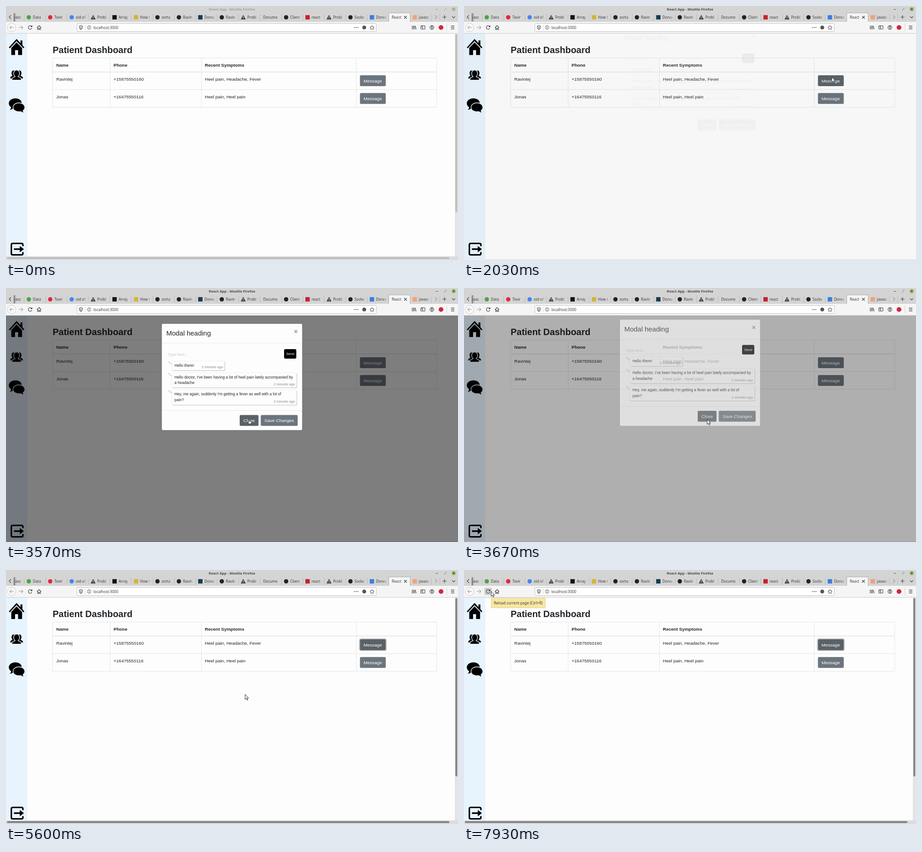
These frames come from a looping animation (998 by 561 pixels, 8000 ms). An HTML page:

```html
<!DOCTYPE html>
<html lang="en">
<head>
<meta charset="utf-8">
<title>Patient Dashboard</title>
<style>
html, body { margin: 0; width: 100%; height: 100%; overflow: hidden; }
svg { display: block; width: 998px; height: 561px; }
text { font: 9.98px "Liberation Sans", Arial, sans-serif; fill: #212529; white-space: pre; }
.ui { font: 8.1px "Noto Sans", sans-serif; fill: #3c3c3c; }
.title { font-weight: 700; font-size: 7.8px; }
.b { font-weight: 700; }
.h1 { font-weight: 700; font-size: 19.96px; }
.h4 { font-size: 14.97px; }
.msg { font-size: 8.48px; }
.ago { font-size: 7.5px; fill: #888; }
.send { font-size: 7.5px; fill: #fff; }
.hint { font-size: 8.48px; fill: #c9c9c9; }
.btn { fill: #fff; }
.line { fill: none; stroke: #444; stroke-width: 1.2; }
</style>
</head>
<body>
<svg id="stage" viewBox="0 0 998 561"></svg>
<script>
const rect = (x, y, w, h, fill, more = '') =>
  `<rect x="${x}" y="${y}" width="${w}" height="${h}" fill="${fill}" ${more}/>`;
const text = (x, y, s, cls = '', more = '') => `<text x="${x}" y="${y}" class="${cls}" ${more}>${s}</text>`;
const path = (d, more = 'class="line"') => `<path d="${d}" ${more}/>`;
const dot = (x, y, r, more) => `<circle cx="${x}" cy="${y}" r="${r}" ${more}/>`;
const button = (id, x, y, w, label) =>
  rect(x, y, w, 24, '#6c757d', `id="${id}" rx="2.5"`) + text(x + 8, y + 15.7, label, 'btn');

// Tabs: label, icon shape (c circle, s square, w warning), icon colour
const tabs = [
  ['Data', 'c', '#4aa545'], ['Tovir', 'c', '#e0283c'], ['oid of', 'c', '#4285f4'], ['Probl', 'w'],
  ['Array', 's', '#111'], ['How t', 's', '#d3b53c'], ['sorta', 'c', '#222'], ['Ravin', 'c', '#222'],
  ['Dorva', 's', '#123c50'], ['Ravin', 'c', '#222'], ['Probl', 'w'], ['Docume'], ['Client', 'c', '#222'],
  ['react', 's', '#c8202c'], ['Probl', 'w'], ['Socke', 'c', '#222'], ['Dorva', 's', '#3b7de0'],
  ['React'], ['javasc', 's', '#f0a274']
];

function tabIcon(x, kind, color) {
  if (kind === 'c') return dot(x, 25, 4.8, `fill="${color}"`);
  if (kind === 's') return rect(x - 4.8, 20.2, 9.6, 9.6, color);
  return kind ? path(`M${x} 20.4l4.8 8.8h-9.6z`, 'fill="#444" stroke="#444" stroke-linejoin="round"') +
    path(`M${x} 23.3v3M${x} 27.2v1.1`, 'stroke="#eee" stroke-width="1.1"') : '';
}

function tabStrip() {
  let out = text(17, 27.8, 'vasc', 'ui');
  out += rect(17, 16, 6, 18, 'url(#shade)') + rect(30, 16, 10, 18, 'url(#fade)');
  tabs.forEach(([label, kind, color], i) => {
    const x = 40 + i * 47.35, active = label === 'React';
    if (active) out += rect(x, 15, 47.5, 21, '#f5f5f6') + path(`M${x} 35V15.3h47.5V35`, 'fill="none" stroke="#a9a9a9"');
    const start = x + (kind ? 19.3 : 6.8), room = active ? 23 : x + 44 - start;
    out += `<svg x="${start}" y="15" width="${room}" height="20">${text(0, 12.8, label, 'ui')}</svg>`;
    out += tabIcon(x + 10.3, kind, color);
    if (active) out += path(`M${x + 34} 22l6 6m0-6l-6 6`);
    else out += rect(x + 36, 17, 9.5, 17, 'url(#fade)') + rect(x + 47, 18, .7, 14, '#aeaeae');
  });
  return out + rect(39.8, 18, .7, 14, '#aeaeae') + path('M11 20.5l-4 4 4 4M964 24.5h8.5M968.2 20.2v8.6M985 23l3.3 3.3 3.3-3.3') +
    path('M947.5 20.5l4 4-4 4', 'fill="none" stroke="#999" stroke-width="1.2"') + rect(957.5, 18, .7, 14, '#aeaeae');
}

function toolbar() {
  return rect(0, 35, 998, 26, '#f5f5f6') + rect(0, 60, 998, .9, '#c6c6c6') +
    dot(12.5, 47.4, 9.3, 'fill="#f9f9f9" stroke="#cacaca"') +
    path('M17 47.4H8.3m4-4l-4 4 4 4M28.5 47.4h9m-4-4l4 4-4 4', 'fill="none" stroke="#a6a6a6" stroke-width="1.2"') +
    rect(45, 39, 16.5, 16.5, '#d0d0d1', 'id="reload" rx="2"') +
    path('M56.6 45.2A4 4 0 1 0 57 49') + path('M58 42.6v4h-4z', 'fill="#333"') +
    path('M68.3 47.8l4.7-4.4 4.7 4.4M69.8 47v5h2.2v-3h2v3h2.2v-5') +
    rect(156.5, 38.5, 661, 18, '#fff', 'rx="2" stroke="#bdbdc8"') +
    path('M165.3 43.3l3.4 1.1c0 4.4-.9 6.3-3.4 7.5-2.5-1.2-3.4-3.1-3.4-7.5z') + path('M165.3 45.5v4.3') +
    rect(174.3, 41, .7, 13, '#bbb') + dot(183.5, 47.5, 4, 'class="line" style="stroke-width:.9"') +
    path('M183.5 46.8v3M183.5 44.8v1.1') + text(193, 50.5, 'localhost:3000', 'ui') +
    [769.5, 773.3, 777].map(x => dot(x, 47.5, 1.1, 'fill="#444"')).join('') + dot(791, 47.5, 4.3, 'fill="#555"') +
    path('M808.3 43l1.4 3 3.3.4-2.4 2.2.6 3.3-2.9-1.6-2.9 1.6.6-3.3-2.4-2.2 3.3-.4z', 'class="line" style="stroke-width:1"') +
    path('M897 43.5v8M899.5 43.5v8M902 43.5v8M903.5 44l2 7.5') +
    rect(916, 43.5, 9, 7.5, 'none', 'rx="1" stroke="#444" stroke-width="1.2"') + path('M919.8 43.5v7.5M917 46h2') +
    dot(940.4, 47.4, 4.2, 'class="line"') + dot(940.4, 46.2, 1.7, 'fill="#444"') + path('M937.4 50.4q3-3 6 0z', 'fill="#444"') +
    dot(960.5, 47.4, 5.2, 'fill="#d8203c"') + rect(973, 39, .7, 17, '#ccc') +
    path('M982.5 44.2h7.5M982.5 47.4h7.5M982.5 50.6h7.5');
}

function sidebar() {
  const gap = 'stroke="#e8f4fd" stroke-width="1.4"';
  return rect(0, 61, 47, 500, '#e8f4fd') +
    path('M6.3 91.5L23.3 72.8 32 82v-6h4.2v10.6l4.3 4.9-2 2L23.3 77.6 8.4 93.5z') .replace('class="line"', '') +
    path('M11.6 92.7L23.3 80.2 35.5 92.7V108.3H26.7V97.5H20V108.3H11.6z', '') +
    path('M9.5 160c0-4 2-4.5 5-6-3.2-3-3-11.5 2-11.5h13.5c5 0 5.200 8.500 2 11.500 3 1.500 5.500 2 5.500 6z', '') +
    path('M13 163.700c0-5.500 3-6 7-7.700-5-5-3.800-14.500 3.400-14.500s8.400 9.500 3.400 14.500c4 1.700 7.200 2.200 7.200 7.700z', gap) +
    path('M20.500 204C12 204 6.200 209 6.200 215c0 4 2.300 6.800 5 8.500 0 2.500-1.200 4-3 5.500 4 0 6.500-1.500 8.200-3.600C28 227 34.700 222 34.700 215S29 204 20.500 204z', '') +
    path('M28.500 214c8 0 13 4.500 13 10 0 3.500-1.800 5.700-4 7.300.3 2 1.500 3.300 3.200 4.700-4 0-6.300-1.200-8-2.900C22 234.500 15.500 230 15.500 224c0-5.500 5-10 13-10z', gap) +
    path('M37.300 530.500v-3.200q0-3-3-3H14.800q-3 0-3 3v19.400q0 3 3 3h19.500q3 0 3-3v-3.200', 'fill="none" stroke="#000" stroke-width="3.200"') +
    path('M17.500 535.300H30.500V530L39.500 537l-9 7v-5.300H17.500z', '');
}

function page() {
  const cols = [103, 230, 431.5, 773.5, 951], rows = [115, 145.500, 184.700, 223.700];
  const row = (y, cls, ...cells) => cells.map((s, i) => text([111, 237.500, 439][i], y, s, cls)).join('');
  return rect(0, 61, 998, 500, '#fdfdfd') + rect(0, 560, 998, 1, '#d8d8d8') + sidebar() +
    text(103, 104, 'Patient Dashboard', 'h1') +
    path(cols.map(x => `M${x} 115V223.700`).join('') + rows.map(y => `M103 ${y}H951`).join('') + 'M103 146H951',
      'fill="none" stroke="#dee2e6" stroke-width=".9"') +
    row(133.500, 'b', 'Name', 'Phone', 'Recent Symptoms') +
    row(164.600, '', 'Ravintej', '+15875550160', 'Heel pain, Headache, Fever') +
    row(203.500, '', 'Jonas', '+16475550116', 'Heel pain, Heel pain') +
    rect(780.500, 152, 59, 26, 'none', 'id="ring" rx="3.500" stroke="#828a91" stroke-opacity=".5" stroke-width="2"') +
    button('msg1', 781.500, 153, 57, 'Message') + button('msg2', 781.500, 192.300, 57, 'Message');
}

function bubble(y, w, h, lines) {
  return path(`M358 ${y + 1}l8 7`, 'stroke="#c4c4c4" stroke-width="1.400"') +
    rect(367, y + 1, w, h, '#b5b5b5', 'rx="2.500"') + rect(366, y, w, h, '#fdfdfd', 'rx="2.500" stroke="#e6e6ea" stroke-width=".6"') +
    lines.map((s, i) => text(372, y + 12.500 + i * 12.700, s, 'msg')).join('') +
    text(366 + w - 50.500, y + h - 4.800, '2 minutes ago', 'ago');
}

function modal() {
  return rect(344, 79, 310, 235, '#fdfdfd', 'rx="3" stroke="#000" stroke-opacity=".2" stroke-width=".6"') +
    text(354, 105, 'Modal heading', 'h4') + text(635.500, 101.300, '×', 'h4 b', 'opacity=".5"') +
    rect(344, 121.300, 310, .7, '#dee2e6') + rect(344, 270, 310, .7, '#dee2e6') +
    text(357, 149.800, 'Type here...', 'hint') +
    rect(614, 135, 27, 21, '#000', 'rx="3"') + text(618.700, 148, 'Send', 'send') +
    bubble(161, 116.500, 21, ['Hello there!']) +
    bubble(187, 275.500, 33, ["Hello doctor, I've been having a lot of heel pain lately accompanied by", 'a headache']) +
    bubble(224.700, 275.500, 33.500, ["Hey, me again, suddenly I'm getting a fever as well with a lot of", 'pain?']) +
    button('close', 516, 280.500, 41.500, 'Close') + button('save', 562.500, 280.500, 81.500, 'Save Changes');
}

const pen = 'fill="#fff" stroke="#1c1c1c" stroke-width=".95" stroke-linejoin="round"';
stage.innerHTML = `<defs>
  <linearGradient id="fade"><stop stop-color="#d4d4d4" stop-opacity="0"/><stop offset=".8" stop-color="#d4d4d4"/></linearGradient>
  <linearGradient id="shade"><stop stop-color="#666"/><stop offset="1" stop-color="#999" stop-opacity="0"/></linearGradient>
  <clipPath id="view"><rect y="61" width="998" height="500"/></clipPath></defs>` +
  rect(0, 0, 998, 36, '#d4d4d4') + text(499, 10.300, 'React App - Mozilla Firefox', 'ui title', 'id="title" text-anchor="middle"') +
  `<g id="controls">${dot(988.500, 7, 4.600, 'fill="#8fb85c"')}` +
  path('M949 7.500h4.500M967.500 8.500v-0M968 9.200l1.200-1.200M970.500 6l1.300-1.300M986.900 5.400l3.200 3.200m0-3.200l-3.200 3.200') + '</g>' +
  tabStrip() + toolbar() + page() +
  '<g id="bars">' + rect(991, 61, 7, 492, '#e4e4e6') + rect(0, 553, 998, 8, '#dcdcde') +
  rect(992.300, 62, 4, 394, '#808080', 'rx="2" class="thumb"') + rect(2, 554.800, 977, 4, '#808080', 'rx="2" class="thumb"') + '</g>' +
  rect(0, 61, 998, 500, '#000', 'id="shadow"') +
  `<g clip-path="url(#view)"><g id="dialog">${modal()}</g></g>` +
  '<g id="tip">' + rect(60, 62, 119.500, 21.500, '#f7e7a2', 'stroke="#dccb84" stroke-width=".8"') +
  text(66, 75.500, 'Reload current page (Ctrl+R)', 'ui') + '</g>' +
  '<g id="cursor">' + path('M0 0V11L2.500 8.800 4.200 12.700 6 11.900 4.300 8.100H7.600z', pen + ' id="arrow"') +
  path('M-1 .5Q0-.8 1 .5V4.500Q2 3.800 2.700 4.700 3.600 4.200 4.200 5.200 5.300 5 5.300 6.500L4.500 10H-1L-3.500 6.500Q-3.300 5.200-1 6.700z', pen + ' id="hand"') + '</g>';

const $ = id => document.getElementById(id);
const set = (id, name, value) => $(id).setAttribute(name, value);
const show = (id, amount) => set(id, 'opacity', amount);
const ramp = (t, start, length) => Math.min(1, Math.max(0, (t - start) / length));

// CSS ease-out, cubic-bezier(0, 0, .58, 1)
function easeOut(x) {
  let lo = 0, hi = 1;
  for (let i = 0; i < 20; i++) {
    const s = (lo + hi) / 2;
    if (1.74 * s * s * (1 - s) + s ** 3 < x) lo = s; else hi = s;
  }
  return 3 * lo * lo - 2 * lo ** 3;
}

// Pointer track: time, x, y
const track = [
  [250, 860, 575], [830, 822, 205], [1250, 812, 157], [2400, 812, 157], [3250, 537, 290], [3900, 537, 290],
  [4400, 526, 271], [5567, 526, 271], [5600, 528, 274.7], [5630, 528, 275], [5790, 528, 275], [6200, 379, 156],
  [6440, 379, 156], [6700, 200, 72], [6860, 95, 34], [6980, 48, 40], [7130, 57, 46], [7270, 60, 47]
];

function slope(i, k) {
  const a = track[i - 1], b = track[i], c = track[i + 1];
  if (!a || !c) return 0;
  const d = (b[k] - a[k]) * (c[k] - b[k]);
  return d > 0 ? (c[k] - a[k]) / (c[0] - a[0]) : 0;
}

function pointer(t) {
  const i = track.findIndex(p => p[0] > t);
  if (i === 0) return [track[0][1], track[0][2]];
  if (i < 0) return track[track.length - 1].slice(1);
  const a = track[i - 1], b = track[i], span = b[0] - a[0], u = (t - a[0]) / span, v = 1 - u;
  return [1, 2].map(k => a[k] * v * v * (1 + 2 * u) + b[k] * u * u * (3 - 2 * u) +
    span * u * v * (slope(i - 1, k) * v - slope(i, k) * u));
}

const mix = k => `rgb(${[[108, 90], [117, 98], [125, 104]].map(([a, b]) => a + (b - a) * k)})`;
const OPEN = 2026, SHUT = 3610, DONE = 3790, TICK = 100 / 3;

function draw(now) {
  const t = Math.floor((now % 8000 + 5) / TICK) * TICK;
  const shown = t < SHUT ? ramp(t, OPEN, 163) : 1 - ramp(t, SHUT, 150);
  const lift = t < SHUT ? 1 - easeOut(ramp(t, OPEN, 343)) : easeOut(ramp(t, SHUT, 300));
  const focus = ramp(t, DONE, 150);
  show('shadow', shown / 2);
  show('dialog', shown);
  set('dialog', 'transform', `translate(0 ${-31.2 * lift})`);
  show('bars', t >= OPEN && t < DONE ? 0 : 1);
  show('ring', focus);
  set('msg1', 'fill', mix(ramp(t, 1120, 150) - ramp(t, OPEN, 150) + focus));
  set('close', 'fill', mix(ramp(t, 3130, 150)));

  const active = t >= 200;
  $('title').style.fill = active ? '#484848' : '#a2a2a2';
  show('controls', active ? 1 : .45);
  document.querySelectorAll('.thumb').forEach(e => e.setAttribute('fill', active ? '#808080' : '#bdbdbd'));

  const [x, y] = pointer(t);
  const hand = t > 1120 && t < OPEN || t > 3130 && t < SHUT;
  set('cursor', 'transform', `translate(${x} ${y})`);
  show('arrow', hand ? 0 : 1);
  show('hand', hand ? 1 : 0);
  show('reload', x > 45 && x < 61.5 && y > 39 && y < 56 ? 1 : 0);
  show('tip', ramp(t, 7767, 160));
}

function loop() {
  draw(performance.now());
  requestAnimationFrame(loop);
}
loop();
</script>
</body>
</html>
```
